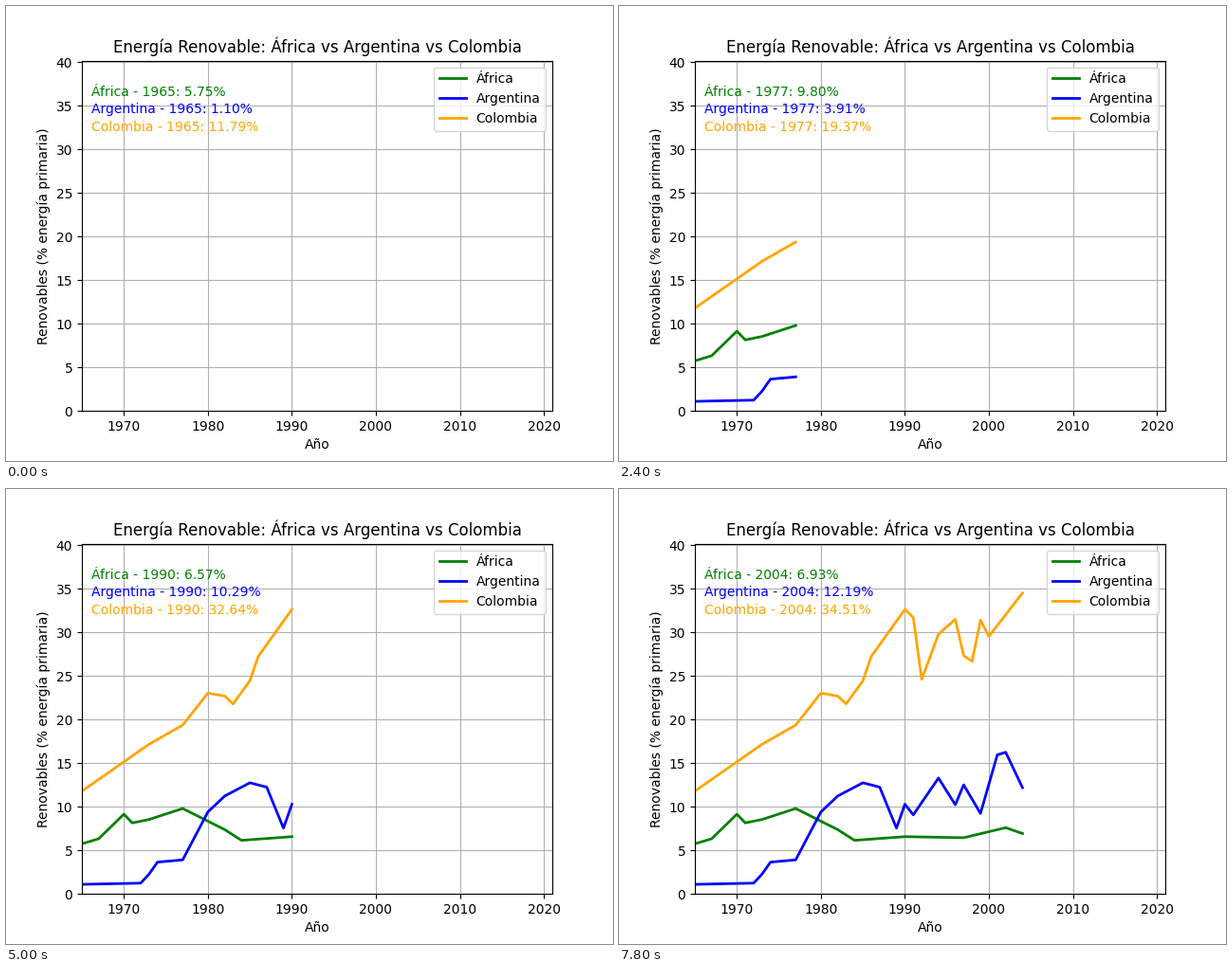
Animation of 640x480 px, one loop 8 s. Source, as a matplotlib script:

```python
import numpy as np
import matplotlib.pyplot as plt
from matplotlib.animation import FuncAnimation

START, END, FRAMES = 1965, 2021, 40
YEARS = np.arange(START, START + FRAMES)

# Turning points of each curve; the years between them lie on straight runs.
TURNS = {
    "África": ("green", {
        1965: 5.75, 1967: 6.33, 1970: 9.15, 1971: 8.15, 1973: 8.54,
        1977: 9.80, 1982: 7.38, 1984: 6.15, 1990: 6.57, 1997: 6.45,
        2002: 7.60, 2004: 6.93}),
    "Argentina": ("blue", {
        1965: 1.10, 1972: 1.24, 1973: 2.28, 1974: 3.65, 1977: 3.91,
        1980: 9.40, 1982: 11.23, 1985: 12.75, 1987: 12.25, 1989: 7.55,
        1990: 10.29, 1991: 9.07, 1994: 13.30, 1996: 10.23, 1997: 12.51,
        1999: 9.23, 2001: 15.95, 2002: 16.25, 2004: 12.19}),
    "Colombia": ("orange", {
        1965: 11.79, 1973: 17.17, 1977: 19.37, 1980: 23.03, 1982: 22.70,
        1983: 21.80, 1985: 24.45, 1986: 27.25, 1990: 32.64, 1991: 31.70,
        1992: 24.60, 1994: 29.80, 1996: 31.50, 1997: 27.33, 1998: 26.70,
        1999: 31.40, 2000: 29.55, 2004: 34.51}),
}

fig, ax = plt.subplots(figsize=(6.4, 4.8), dpi=100)
ax.set_xlim(START, END)
ax.set_ylim(0, 40.18)
ax.set_title("Energía Renovable: África vs Argentina vs Colombia")
ax.set_xlabel("Año")
ax.set_ylabel("Renovables (% energía primaria)")
ax.grid(True)


def make_series(row, name, color, turns):
    values = np.interp(YEARS, list(turns), list(turns.values()))
    line, = ax.plot([], [], color=color, lw=2, label=name)
    label = ax.text(0.02, 0.90 - 0.05 * row, "", color=color,
                    transform=ax.transAxes)
    return name, values, line, label


series = [make_series(row, name, *spec)
          for row, (name, spec) in enumerate(TURNS.items())]
ax.legend(loc="upper right")


def update(i):
    for name, values, line, label in series:
        line.set_data(YEARS[:i + 1], values[:i + 1])
        label.set_text(f"{name} - {YEARS[i]}: {values[i]:.2f}%")


anim = FuncAnimation(fig, update, frames=FRAMES, interval=200,
                     repeat=True, repeat_delay=0)
plt.show()
```
